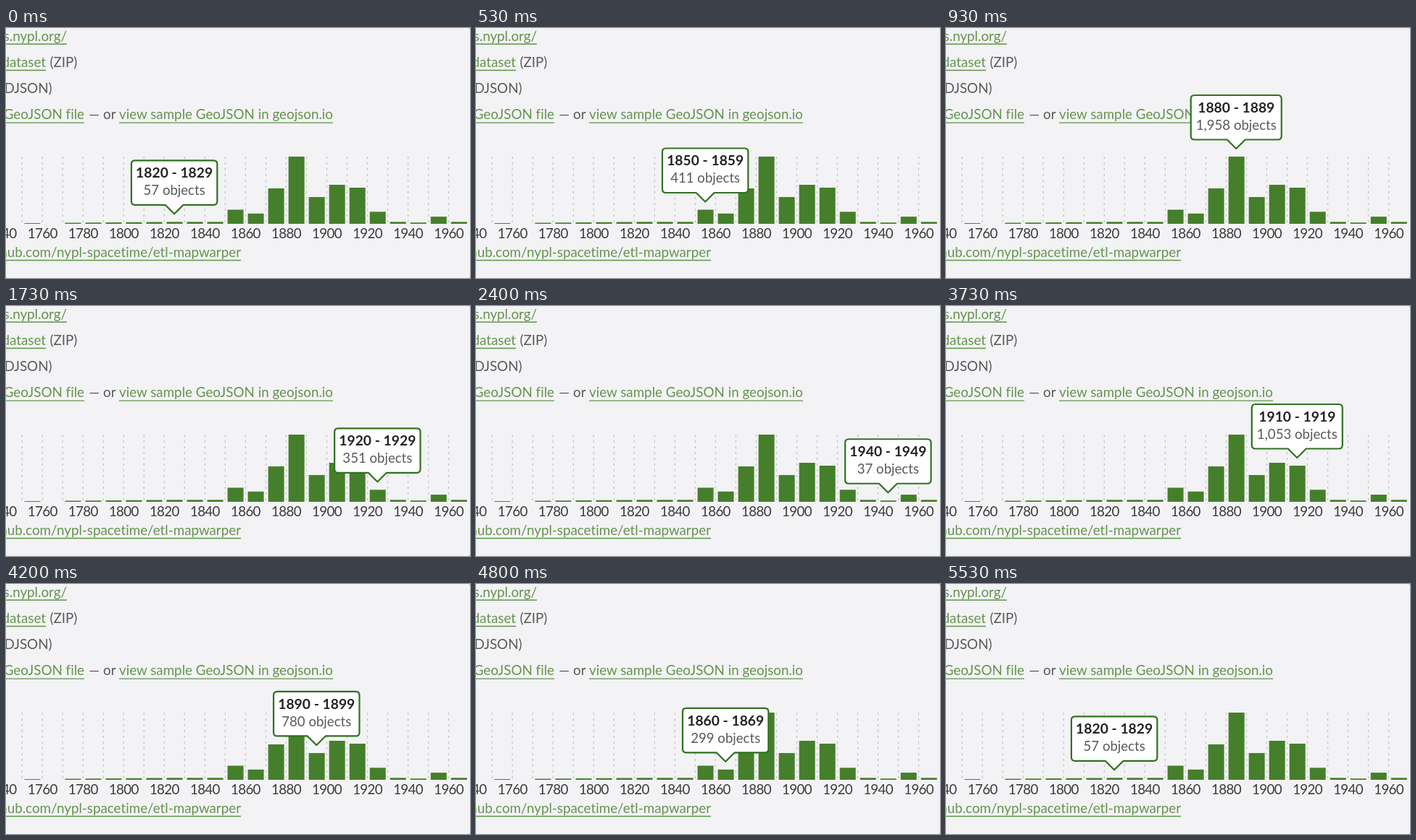
Recreate the animation shown at these times as an HTML page. Size 640 px wide and 346 px high, loop 5.59 s.

```html
<!DOCTYPE html>
<html lang="en">
<head>
<meta charset="utf-8">
<title>Objects per decade</title>
<style>
  html, body { margin: 0; width: 100%; height: 100%; overflow: hidden; background: #bdbdbd; }
  svg { display: block; width: 640px; height: 346px; }
  text { font: 18.8px Lato, "Open Sans", sans-serif; font-variant-ligatures: none; fill: #5a5a5a; }
  .link { fill: #64944f; }
  .rule { stroke: #5a9548; stroke-width: 1.4; }
  .grid { stroke: #c4c4c4; stroke-width: 1.3; stroke-dasharray: 3 5; }
  .bar { fill: #457f2b; }
  .year { fill: #3c3c3c; letter-spacing: -0.7px; text-anchor: middle; }
  .box { fill: #fff; stroke: #2e7220; stroke-width: 2.2; stroke-linejoin: round; }
  .tip text { text-anchor: middle; }
  .tip .range { font-size: 19.3px; font-weight: 700; fill: #222; }
  .tip .count { font-size: 18.6px; }
</style>
</head>
<body>
<svg id="stage" viewBox="0 0 640 346"></svg>
<script>
const NS = "http://www.w3.org/2000/svg";
const stage = document.getElementById("stage");
const BASE = 271, STEP = 28.02, SCALE = 0.0475, LOOP = 5590;
const FIRST = 1750, LAST = 1960;

// Decades that stand out from the slow early rise
const peaks = {
  1760: 0, 1850: 411, 1860: 299, 1870: 1032, 1880: 1958, 1890: 780,
  1900: 1137, 1910: 1053, 1920: 351, 1940: 37, 1950: 208
};
const countOf = year => peaks[year] ?? Math.round(Math.min(57, 20 + (year - FIRST) * 0.53));

// Pointer sweep: [ms, year], linear in between
const sweep = [[0, 1820], [800, 1880], [1530, 1920], [2130, 1940], [3330, 1940], [LOOP, 1820]];

function hoveredDecade(t) {
  const next = sweep.findIndex(([at]) => at > t);
  const [t0, y0] = sweep[next - 1], [t1, y1] = sweep[next];
  const year = y0 + (y1 - y0) * (t - t0) / (t1 - t0);
  return Math.floor(year / 10) * 10;
}

function add(name, attrs, parent = stage, content = "") {
  const el = document.createElementNS(NS, name);
  for (const key in attrs) el.setAttribute(key, attrs[key]);
  el.textContent = content;
  parent.appendChild(el);
  return el;
}

const yearX = year => 50.2 + (year - 1760) / 10 * STEP;

function label(content, x, y, anchor = "start", cls = "") {
  add("text", { x, y, "text-anchor": anchor, class: cls }, stage, content);
}

function link(content, from, to, y, anchor = "end") {
  label(content, anchor === "end" ? to : from, y, anchor, "link");
  add("line", { x1: from, x2: to, y1: y + 4.8, y2: y + 4.8, class: "rule" });
}

function drawPage() {
  add("path", { d: "M0 0H637Q640 0 640 3V343Q640 346 637 346H0Z", fill: "#f3f2f4" });
  link("s.nypl.org/", 0, 84, 17.5);
  link("dataset", 0, 55, 53.7);
  label("(ZIP)", 60.5, 53.7);
  label("DJSON)", 63.5, 90, "end");
  link("GeoJSON file", 0, 108, 126.3);
  label("— or", 151.5, 126.3, "end");
  link("view sample GeoJSON in geojson.io", 156, 451, 126.3, "start");
  link("hub.com/nypl-spacetime/etl-mapwarper", 0, 324, 316.7);
}

function drawChart() {
  for (let year = FIRST; year <= LAST; year += 10) {
    const x = yearX(year), height = countOf(year) * SCALE;
    add("line", { x1: x, x2: x, y1: 178, y2: BASE, class: "grid" });
    add("rect", { x: x + 3.2, y: BASE - height, width: 22, height, class: "bar" });
  }
  for (let year = 1740; year <= LAST; year += 20) label(year, yearX(year), 291, "middle", "year");
}

drawPage();
drawChart();

const tip = add("g", { class: "tip" });
const box = add("path", { class: "box" }, tip);
const range = add("text", { y: -50, class: "range" }, tip);
const total = add("text", { y: -26.3, class: "count" }, tip);

// Outline with its pointer at the origin
function bubble(w) {
  const r = 5, top = -74, low = -12.5;
  return `M0 0L-12.5 ${low}H${r - w}Q${-w} ${low} ${-w} ${low - r}V${top + r}` +
    `Q${-w} ${top} ${r - w} ${top}H${w - r}Q${w} ${top} ${w} ${top + r}` +
    `V${low - r}Q${w} ${low} ${w - r} ${low}H12.5Z`;
}

let shown = null;
function show(year) {
  if (year === shown) return;
  shown = year;
  const count = countOf(year);
  const x = yearX(year) + STEP / 2 - 0.2, y = BASE - count * SCALE - 11;
  tip.setAttribute("transform", `translate(${x} ${y})`);
  box.setAttribute("d", bubble(count < 1000 ? 59.2 : 62.5));
  range.textContent = `${year} - ${year + 9}`;
  total.textContent = `${count.toLocaleString("en-US")} objects`;
}

const start = performance.now();
function tick() {
  show(hoveredDecade((performance.now() - start) % LOOP));
  requestAnimationFrame(tick);
}
tick();
</script>
</body>
</html>
```
